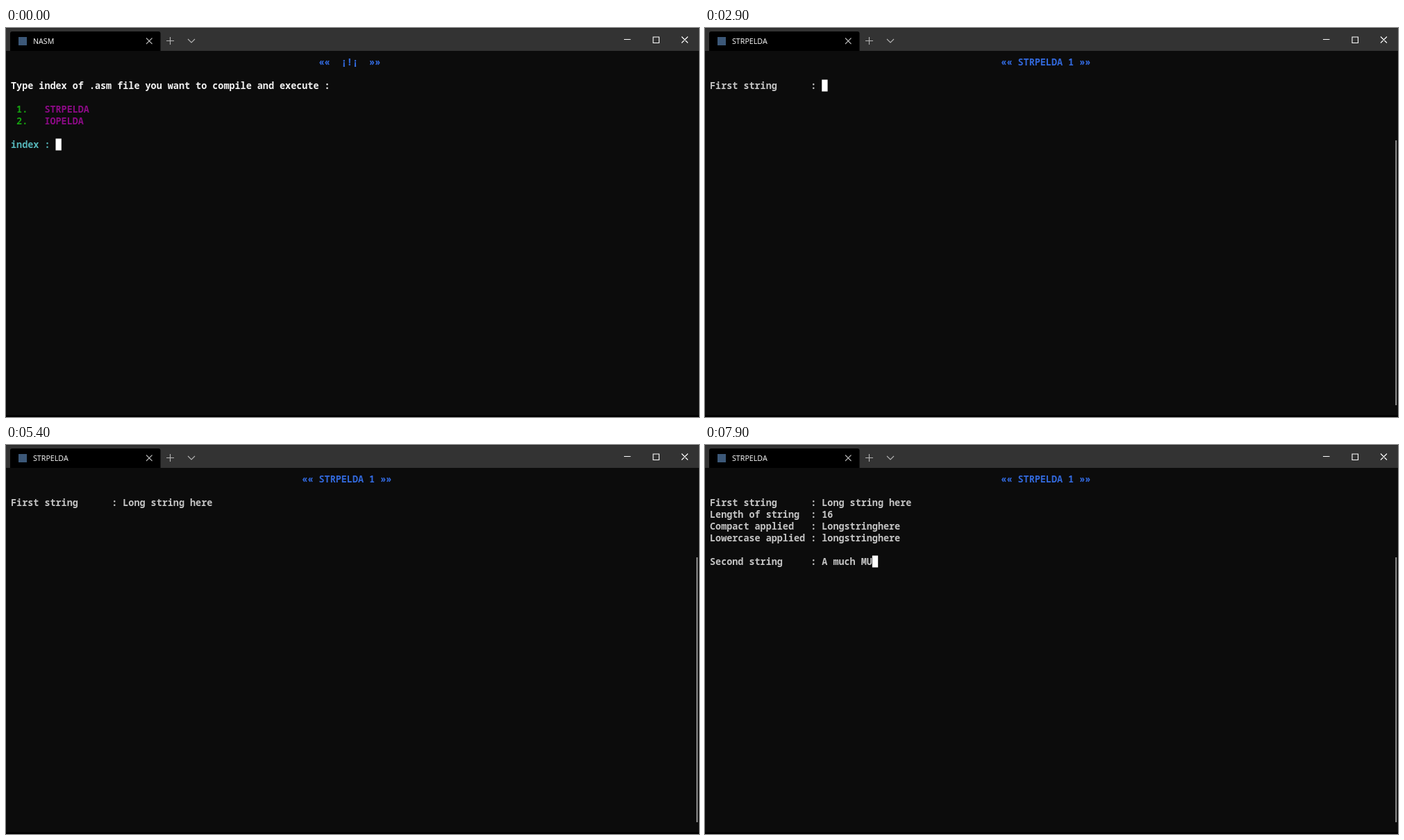
Animation of 998 by 561 pixels, one loop 8000 ms. Source, as an HTML page:

```html
<!DOCTYPE html>
<html lang="en">
<head>
<meta charset="utf-8">
<title>Terminal</title>
<style>
  html, body { margin: 0; width: 100%; height: 100%; overflow: hidden; background: #0c0c0c; }
  svg { display: block; width: 998px; height: 561px; }
  #screen text { font: 600 13.44px "Noto Sans Mono", "DejaVu Sans Mono", monospace; white-space: pre; font-variant-ligatures: none; }
  #title { font: 10.7px "Open Sans", "Noto Sans", sans-serif; fill: #fff; }
  .line { fill: none; stroke-width: 1.1; }
</style>
</head>
<body>
<svg viewBox="0 0 998 561">
  <rect width="998" height="561" fill="#0c0c0c"/>
  <rect width="998" height="33" fill="#333"/>
  <rect width="998" height="1" fill="#292929"/>
  <path d="M6 33V8q0-3 3-3H219.500q3 0 3 3V33z" fill="#000"/>
  <rect x="18" y="13" width="12" height="12" fill="#3c5878"/>
  <text id="title" x="39" y="23"></text>
  <path class="line" stroke="#b4b4b4" d="M202 14.500l8.500 8.500m0-8.500l-8.500 8.500M231 18.500h11m-5.500-5.500v11M262 16l5 5 5-5"/>
  <path class="line" stroke="#fff" d="M890 16.500h9.500M932 13h8.500v8.500h-8.500zM973 12.500l9 9m0-9l-9 9"/>
  <rect y="558.500" width="998" height="2.500" fill="#000"/>
  <g id="screen"></g>
  <rect id="cursor" width="8.300" height="17" fill="#fff"/>
  <rect id="scrollbar" x="994.300" y="162" width="1.900" height="382" fill="#9c9c9c"/>
</svg>
<script>
const LOOP = 8000, LEFT = 7, TOP = 41, CELL = 8.064, ROW = 17;
const GRAY = '#c4c4c4', WHITE = '#f2f2f2', BLUE = '#3269dc',
      GREEN = '#16a110', MAGENTA = '#8c0a86', CYAN = '#55b4b8';

const byId = id => document.getElementById(id);
const title = byId('title'), screen = byId('screen'),
      cursor = byId('cursor'), scrollbar = byId('scrollbar');

// Key presses as [time, number of characters typed so far].
const FIRST = 'Long string here';
const FIRST_KEYS = [[3100, 1], [3300, 2], [3600, 4], [3700, 5], [3900, 6], [4000, 7], [4100, 8],
  [4200, 9], [4400, 11], [4500, 12], [4600, 13], [4700, 15], [4800, 16]];
const SECOND = 'A much MU';
const SECOND_KEYS = [[6600, 1], [6800, 2], [6900, 3], [7100, 4], [7200, 5], [7300, 6],
  [7400, 7], [7700, 8], [7900, 9]];
const CURSOR_OFF = [[500, 700], [1300, 2300], [2500, 2900], [5400, 5500], [6000, 6200]];

const typed = (text, keys, t) =>
  text.slice(0, keys.reduce((n, [at, count]) => t >= at ? count : n, 0));
const field = (label, value) => label.padEnd(18) + ': ' + value;

// Each line is [row, column, colour, text].
function menuLines(t) {
  return [
    [0, 55, BLUE, '««  ¡!¡  »»'],
    [2, 0, WHITE, 'Type index of .asm file you want to compile and execute :'],
    [4, 1, GREEN, '1.'], [4, 6, MAGENTA, 'STRPELDA'],
    [5, 1, GREEN, '2.'], [5, 6, MAGENTA, 'IOPELDA'],
    [7, 0, CYAN, 'index :'],
    [7, 8, GRAY, t >= 700 ? '1' : '']
  ];
}

function programLines(t) {
  const lines = [];
  if (t >= 1900) lines.push([t < 2000 ? 1 : 0, 52, BLUE, '«« STRPELDA 1 »»']);
  if (t >= 2300) lines.push([2, 0, GRAY, field('First string', typed(FIRST, FIRST_KEYS, t))]);
  if (t >= 5500) {
    const compact = FIRST.replaceAll(' ', '');
    lines.push(
      [3, 0, GRAY, field('Length of string', FIRST.length)],
      [4, 0, GRAY, field('Compact applied', compact)],
      [5, 0, GRAY, field('Lowercase applied', compact.toLowerCase())],
      [7, 0, GRAY, field('Second string', typed(SECOND, SECOND_KEYS, t))]
    );
  }
  return lines;
}

function textNode([row, column, colour, content]) {
  const node = document.createElementNS('http://www.w3.org/2000/svg', 'text');
  node.setAttribute('x', LEFT + column * CELL);
  node.setAttribute('y', TOP + row * ROW + 13);
  node.setAttribute('fill', colour);
  node.textContent = content;
  return node;
}

const show = (node, on) => node.setAttribute('visibility', on ? 'visible' : 'hidden');
let lastStep = -1;

function render(t) {
  const step = Math.floor(t / 100);
  if (step === lastStep) return;
  lastStep = step;

  const inMenu = t < 1800;
  const lines = inMenu ? menuLines(t) : programLines(t);
  title.textContent = inMenu ? 'NASM' : 'STRPELDA';
  screen.replaceChildren(...lines.map(textNode));

  const [row, column, , content] = lines.at(-1) || [0, 0, '', ''];
  cursor.setAttribute('x', LEFT + (column + content.length) * CELL);
  cursor.setAttribute('y', TOP + row * ROW - 0.5);
  show(cursor, !CURSOR_OFF.some(([from, to]) => t >= from && t < to));
  show(scrollbar, t >= 2000);
}

const start = performance.now();
function tick() {
  render((performance.now() - start) % LOOP);
  requestAnimationFrame(tick);
}
render(0);
requestAnimationFrame(tick);
</script>
</body>
</html>
```
